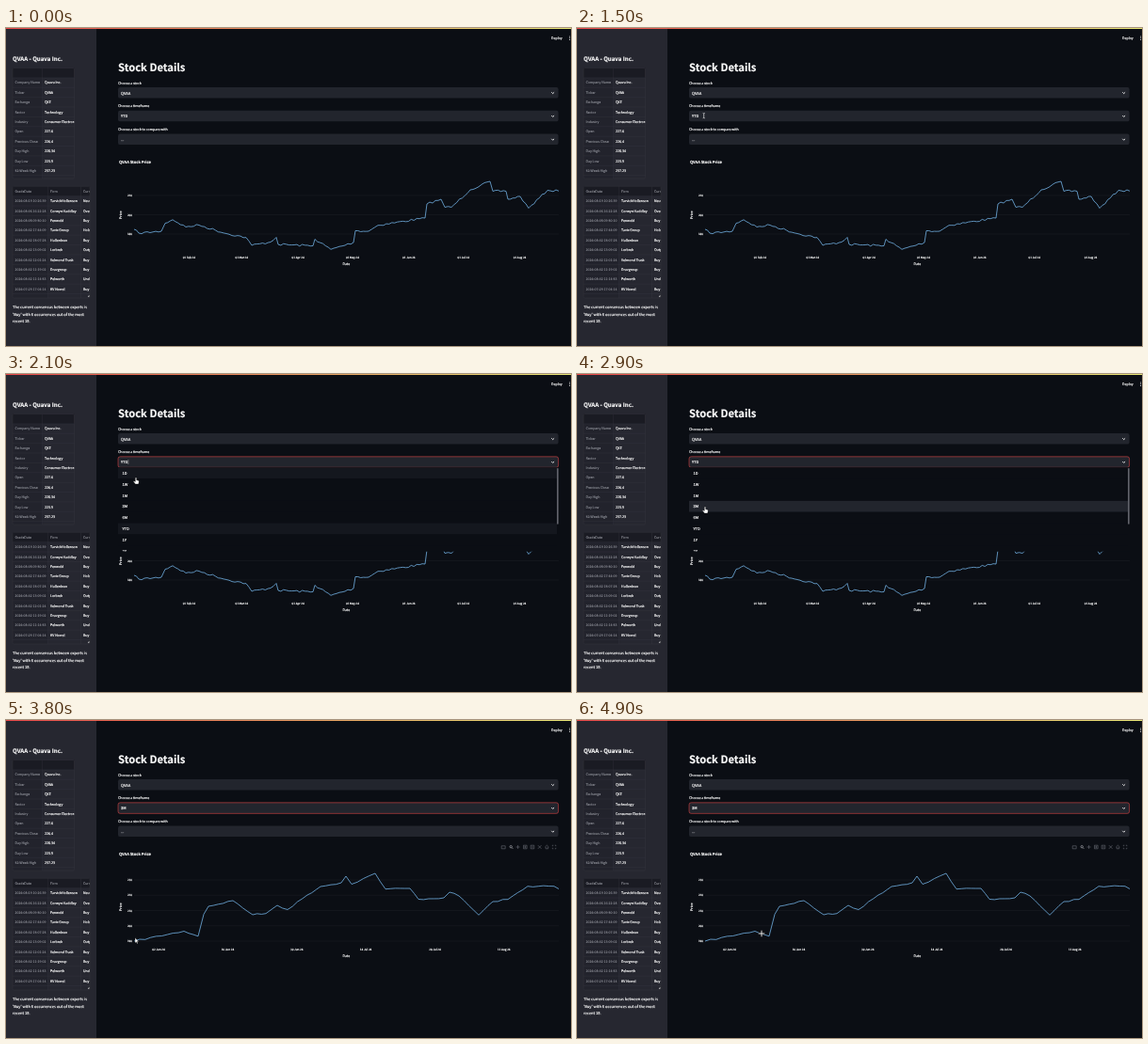
Write an HTML page that moves like this. It is 600 px wide and 338 px high and loops after 5 s.

```html
<!DOCTYPE html>
<html lang="en">
<head>
<meta charset="utf-8">
<title>Stock Details</title>
<style>
  html, body { margin: 0; width: 100%; height: 100%; overflow: hidden; background: #0b0e14; }
  svg { display: block; width: 100vw; height: 100vh; }
  text { font-family: "Noto Sans CJK JP", "Noto Sans CJK SC", "Noto Sans CJK", "Open Sans", sans-serif; text-rendering: geometricPrecision; white-space: pre; }
</style>
</head>
<body>
<svg id="stage" viewBox="0 0 600 338" preserveAspectRatio="none"></svg>
<script>
const LOOP = 5000, STEP = 100;
const BG = '#0b0e14', PANEL = '#262730', FIELD = '#22252d', FAINT = '#14171e', WHITE = '#fafafa', GRAY = '#a3a5ad', GRID = '#3a3b44';
const TICKER = 'QVAA', COMPANY = 'Quava Inc.';
const UNIT = 0.255; // stage size of one page pixel of type

// A thin stroke gives small type the weight of a scaled-down screen.
const text = (x, y, str, { size = 16, fill = WHITE, bold, anchor = 'start', more = '' } = {}) =>
  `<text x="${x}" y="${y}" font-size="${(size * UNIT).toFixed(2)}" fill="${fill}" stroke="${fill}" stroke-width="${fill === GRAY ? .05 : .16}" text-anchor="${anchor}"${bold ? ' font-weight="700"' : ''} ${more}>${str}</text>`;
const rect = (x, y, w, h, fill, more = '') => `<rect x="${x}" y="${y}" width="${w}" height="${h}" fill="${fill}" ${more}/>`;
const path = (d, stroke, width, more = '') => `<path d="${d}" fill="none" stroke="${stroke}" stroke-width="${width}" ${more}/>`;
const group = (id, content) => `<g id="${id}">${content}</g>`;
const clip = (id, x, y, w, h) => `<clipPath id="${id}">${rect(x, y, w, h, WHITE)}</clipPath>`;

// ---- sidebar ----
const ROW = 10.38;

function table(id, y, w, h, splits, rows) {
  const x = 7, right = x + w;
  let lines = splits.map(s => `M${s} ${y}V${y + h}`).join('');
  let cells = '';
  rows.forEach((row, r) => {
    const top = y + r * ROW;
    if (r) lines += `M${x} ${top}H${right}`;
    row.forEach((cell, c) => {
      const left = [x, ...splits][c] + 2.45;
      cells += text(left, top + 6.6, cell, { size: 14, fill: r && c ? WHITE : GRAY });
    });
  });
  return clip(id, x, y, w, h) + rect(x, y, splits[0] - x, h, '#22232c') + rect(x, y, w, ROW, '#1a1b23')
    + `<g clip-path="url(#${id})">${path(lines, GRID, .3)}${cells}</g>`
    + rect(x, y, w, h, 'none', `rx="1.5" stroke="${GRID}" stroke-width=".35"`);
}

const parse = source => source.trim().split('\n').map(line => line.trim().split('|'));

const profile = parse(`|
  Company Name|${COMPANY}
  Ticker|${TICKER}
  Exchange|QXE
  Sector|Technology
  Industry|Consumer Electronics
  Open|227.6
  Previous Close|226.4
  Day High|228.34
  Day Low|223.9
  52-Week High|237.23
  |`);

const grades = parse(`GradeDate|Firm|Current
  2024-08-19 10:26:39|TarvickHollenson|Neutral
  2024-08-06 16:22:28|Corwyn Haddley|Overweight
  2024-08-05 09:50:10|Fenwold|Buy
  2024-08-02 17:44:09|Tavix Group|Hold
  2024-08-02 15:07:25|Hallenbrax|Buy
  2024-08-02 13:09:02|Lorbrek|Outperform
  2024-08-02 12:01:24|Velmond Trask|Buy
  2024-08-02 11:19:02|Dravgroup|Buy
  2024-08-02 11:14:53|Pelworth|Underweight
  2024-07-29 17:04:14|KV Norrel|Buy
  |`);

const sidebar = rect(0, 0, 96, 338, PANEL)
  + text(7, 35.1, `${TICKER} - ${COMPANY}`, { size: 24, bold: true })
  + table('profile', 42.5, 65.5, 117.7, [38.6], profile)
  + table('grades', 168.3, 82, 118.7, [44.6, 79.5], grades)
  + '<path d="M86.8 285.8l1.6-2v2z" fill="#ddd"/>'
  + ['The current consensus between experts is', "'Buy' with 6 occurrences out of the most", 'recent 15.']
    .map((line, i) => text(7, 298.2 + i * 7.3, line)).join('');

const lens = (x, y, color) => `<circle cx="${x}" cy="${y}" r="1.2" fill="none" stroke="${color}" stroke-width=".6"/>`
  + path(`M${x + .9} ${y + .9}l1.2 1.2`, color, .7);

const toolbar = rect(50.5, 33, 22, 8.6, PANEL, 'rx="1.2"')
  + path('M53.6 35.6v2.3m-1-1l1 1 1-1M52.1 38.6h3M70 36.3h-2.2v2.4h2.2z', '#d0d1d6', .45) + lens(60.5, 37, WHITE)
  + rect(70.2, 43.5, 1.9, 95, '#77787f', 'rx=".9"');

// ---- main column ----
const FIELD_TOP = 63.1, FIELD_PITCH = 24.75;

function select(index, label, value, id) {
  const y = FIELD_TOP + index * FIELD_PITCH;
  return text(119, y - 3.5, label, { size: 14 })
    + rect(119, y, 467.6, 11.5, FIELD, `rx="2.2" stroke-width=".5" id="${id}Box"`)
    + text(122, y + 7.5, value, { more: `id="${id}Value"` })
    + path(`M579.3 ${y + 5.2}l1.4 1.4 1.4-1.4`, WHITE, .9);
}

// ---- charts ----
function randomFrom(seed) {
  return () => (seed = (seed * 16807) % 2147483647) / 2147483647 - .5;
}

// Joins key points by a price line that wobbles once per trading day.
function priceLine(keys, day, wobble) {
  const noise = randomFrom(7);
  const points = keys.split(' ').map(p => p.split(',').map(Number));
  return points.flatMap(([x, y], i) => {
    const [nx, ny] = points[i + 1] ?? [x, y];
    const n = Math.max(1, Math.round((nx - x) / day));
    return Array.from({ length: n }, (_, k) =>
      [x + (nx - x) * k / n, y + (ny - y) * k / n + (k ? noise() * wobble : 0)]);
  }).join(' ');
}

const yearLine = priceLine('136,214 141,218 165,216 169,207.5 177,203.8 191,211.5 205,209.5 234,218.5 255,222.7 261,231 281,227.5 287,222.5 289,230 326,231.5 328,224.5 345,235.3 369,228 371,215.5 385,216 395,209.7 445,202 447,187 462,182 466,190.5 473,190.5 493,172 514,163 517,173.5 531,173.5 533,182 546,179 555,191.5 575,172.5 587,173.3', 2.87, 2.2);
const quarterLine = priceLine('136,235 189,224.5 204,229.8 210,206.5 215,198 241,192 262,207 276,205.7 288,197 299,201.5 320,186 334,177 356,173 361,166 367,174.5 392,163 403,179.7 429,179 438,190.5 465,189 471,183 481,187 502,207.3 517,193 533,190.7 554,176.7 582,176.7 587,179.5', 5.6, 1.6);

function chart(id, line, [topPrice, topY, gap, count], dates, dateX) {
  const rows = Array.from({ length: count }, (_, i) => {
    const y = topY + i * gap;
    return path(`M136 ${y}H587`, '#23262d', .35)
      + text(134, y + 1.2, topPrice - i * (count > 3 ? 10 : 20), { size: 12, anchor: 'end' });
  }).join('');
  const columns = dates.map(date => {
    const label = `${String(date.getUTCDate()).padStart(2, '0')} ${MONTHS[date.getUTCMonth()]} 24`;
    return text(dateX(date), 244.8, label, { size: 12, anchor: 'middle' });
  }).join('');
  return group(id, rows + columns + `<polyline points="${line}" fill="none" stroke="#78bbf0" stroke-width=".75" stroke-linejoin="round"/>`);
}

const MONTHS = 'Jan Feb Mar Apr May Jun Jul Aug'.split(' ');
const utc = (month, day) => new Date(Date.UTC(2024, month, day));
const daysSince = (date, from) => (date - from) / 864e5;
const firsts = Array.from({ length: 7 }, (_, i) => utc(i + 1, 1));
const sundays = Array.from({ length: 6 }, (_, i) => utc(5, 2 + 14 * i));

const charts = text(120, 144, `${TICKER} Stock Price`, { bold: true })
  + chart('yearChart', yearLine, [220, 178, 20.5, 3], firsts, d => 194.3 + 1.93 * daysSince(d, firsts[0]))
  + chart('quarterChart', quarterLine, [230, 170, 16.25, 5], sundays, d => 162 + 5.24 * daysSince(d, sundays[0]))
  + text(361.3, 252, 'Date', { size: 14, anchor: 'middle' })
  + text(0, 0, 'Price', { size: 14, anchor: 'middle', more: 'transform="translate(123.2 198.8) rotate(-90)"' });

const BOX = 'M-1.8-1.8h3.6v3.6h-3.6z';
const icons = ['M-2-1.2h4v3h-4z', '', 'M0-2v4M-2 0h4', BOX + 'M-1 0h2M0-1v2', BOX + 'M-1 0h2',
  'M-1.8-1.8l3.6 3.6M1.8-1.8l-3.6 3.6', 'M-2 0l2-1.8 2 1.8M-1.2 0v1.8h2.4V0', 'M-1.8-.8v-1h1M.8-1.8h1v1M1.8.8v1h-1M-.8 1.8h-1v-1'];
const modebar = icons.map((d, i) => path(d, '#6b6e76', .6, `transform="translate(${528.2 + i * 7.7} 135)"`)).join('')
  + lens(536.2, 134.7, '#b9bbc1');

// ---- dropdown ----
const OPTIONS = ['1D', '1W', '1M', '3M', '6M', 'YTD', '1Y', '2Y'], PITCH = 11.85, FIRST = 99.3;
const dropdown = clip('list', 119, 99.3, 468, 89.2) + rect(119, 99.3, 468, 89.2, BG)
  + `<g clip-path="url(#list)">` + OPTIONS.map((o, i) => rect(119, FIRST + i * PITCH, 466, PITCH, BG, `id="option${i}"`)
    + text(123.4, FIRST + i * PITCH + 7.5, o)).join('') + '</g>'
  + group('thumb', rect(585.1, 100, 1.5, 59.8, '#6a6c74', 'rx=".75"'));

// ---- pointers ----
const outlined = d => `<path d="${d}" fill="#fff" stroke="#000" stroke-width=".35"/>`;
const pointers = {
  arrow: outlined('M0 0V5.6L1.3 4.4 2.2 6.3 3.1 5.9 2.3 4.1H4Z'),
  beam: path('M-1-2.7Q0-2.7 0-2V2Q0 2.7-1 2.7M1-2.7Q0-2.7 0-2M0 2Q0 2.7 1 2.7', '#fff', .6),
  hand: outlined('M-.7.6a.7.7 0 0 1 1.4 0V2.8l1.8.4q.9.3.7 1.3L2.7 7H-.6L-2.6 4.5q-.4-1 .6-.8l1.3.8Z'),
  cross: path('M-3.6 0H3.6M0-3.6V3.6', '#000', 1.5) + path('M-3.3 0H3.3M0-3.3V3.3', '#fff', .9)
};

stage.innerHTML = `<defs><linearGradient id="bar"><stop stop-color="#ff4b4b"/><stop offset="1" stop-color="#fffd80"/></linearGradient></defs>`
  + rect(0, 0, 600, 338, BG) + sidebar
  + group('toolbar', toolbar) + group('collapse', path('M84.6 9.6l-1.4 1.5 1.4 1.5', WHITE, .6))
  + rect(0, 0, 600, .9, 'url(#bar)')
  + text(579, 12, 'Deploy', { size: 14 }) + [9, 10.7, 12.4].map(y => `<circle cx="598.6" cy="${y}" r=".5" fill="${WHITE}"/>`).join('')
  + text(119, 46.4, 'Stock Details', { size: 44, bold: true })
  + select(0, 'Choose a stock', TICKER, 'stock')
  + select(1, 'Choose a timeframe', 'YTD', 'frame')
  + select(2, 'Choose a stock to compare with', '...', 'other')
  + charts + group('modebar', modebar) + group('dropdown', dropdown)
  + group('caret', path('M129.8 91.2v4.8', WHITE, .4))
  + group('pointer', Object.entries(pointers).map(([name, shape]) => group(name, shape)).join(''));

// ---- motion ----
const $ = id => document.getElementById(id);
const show = (id, on) => $(id).setAttribute('display', on ? 'inline' : 'none');
const ENTER = 300, OPEN = 1600, HOVER = 2200, PICK = 3000, REDRAW = 3100;

// Each move: start, end, and where the pointer arrives.
const moves = [[ENTER, 800, 64, 84], [1000, 1400, 134.7, 93.2], [1800, 2100, 138, 110],
  [2100, 2700, 136, 141], [3200, 3800, 137, 231.5], [4100, 4800, 196, 227]];

function pointerAt(t) {
  return moves.reduce(([x, y], [from, to, toX, toY]) => {
    const u = Math.min(1, Math.max(0, (t - from) / (to - from))), ease = u * u * (3 - 2 * u);
    return [x + (toX - x) * ease, y + (toY - y) * ease];
  }, [118, 70]);
}

function shapeAt(open, x, y) {
  if (open && y > 99) return 'hand';
  if (x > 119 && y > 88 && y < 99.2) return 'beam';
  return x > 137.5 && y > 155 ? 'cross' : 'arrow';
}

function render(t) {
  const [x, y] = pointerAt(t), open = t >= OPEN && t < PICK, shape = shapeAt(open, x, y);
  $('pointer').setAttribute('transform', `translate(${x} ${y})`);
  show('pointer', t >= ENTER);
  Object.keys(pointers).forEach(name => show(name, name === shape));

  show('collapse', t >= ENTER && x < 96);
  show('toolbar', t >= ENTER && x < 73);

  show('dropdown', open);
  $('dropdown').setAttribute('opacity', Math.min(1, .45 + (t - OPEN) / 250));
  show('thumb', t >= 1900);
  const hover = shape === 'hand' ? Math.floor((y - FIRST) / PITCH) : -1;
  OPTIONS.forEach((name, i) => {
    const current = name === 'YTD' && t < HOVER;
    const lit = i === hover || current;
    const strong = t >= HOVER || hover < 0;
    $('option' + i).setAttribute('fill', !lit ? BG : strong ? FIELD : FAINT);
  });
  show('caret', t >= OPEN && t < HOVER);
  $('frameBox').setAttribute('stroke', t >= OPEN ? '#ff4b4b' : 'none');
  $('frameValue').textContent = t >= PICK ? '3M' : 'YTD';

  show('yearChart', t < REDRAW);
  show('quarterChart', t >= REDRAW);
  show('modebar', t >= REDRAW);
}

const start = performance.now();
function tick() {
  const t = (performance.now() - start) % LOOP;
  render(Math.floor(t / STEP) * STEP);
  requestAnimationFrame(tick);
}
tick();
</script>
</body>
</html>
```
